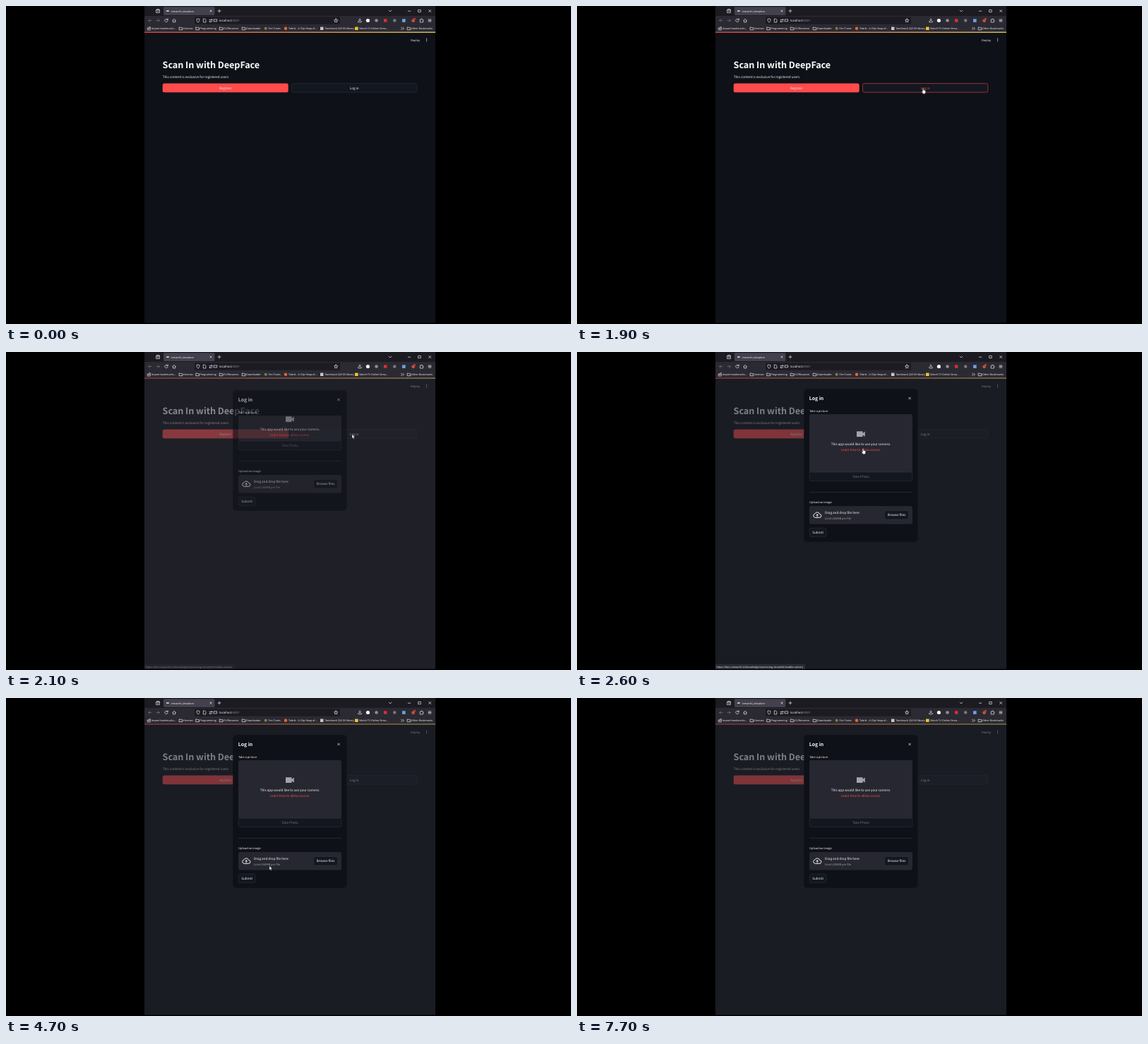
Write an HTML page that moves like this. It is 800 by 450 pixels and loops after 8000 ms.

```html
<!DOCTYPE html>
<html lang="en">
<head>
<meta charset="utf-8">
<title>Log in dialog</title>
<style>
html, body { margin: 0; width: 100%; height: 100%; overflow: hidden; background: #000; }
svg { display: block; width: 100vw; height: 100vh; }
text { fill: #fafafa; text-rendering: geometricPrecision; }
.app text { font: 4.6px "Noto Sans CJK JP", "Noto Sans CJK SC", "Noto Sans CJK", "Noto Sans", sans-serif; }
.app .small { font-size: 4.04px; }
.app .h1 { font-size: 12.65px; font-weight: 700; letter-spacing: -.005em; }
.app .h2 { font-size: 6.9px; font-weight: 700; }
.mid { text-anchor: middle; }
.ui text { font: 3.65px "Open Sans", "Noto Sans", sans-serif; fill: #fbfbfe; }
.ui .url { font-size: 4.3px; }
.icon { fill: none; stroke: #fbfbfe; stroke-width: .65; stroke-linecap: round; stroke-linejoin: round; }
.btn { fill: #131720; stroke: #3d4049; stroke-width: .4; }
.panel { fill: #262730; }
.app .red { fill: #ff4b4b; }
.app .grey { fill: #a3a4a9; }
.app .off { fill: #71737a; }

.hover, .veil, .dialog, .box, .cam, .feed, .low, .status, .cursor, .arrow, .hand {
  animation: 8s linear infinite;
}
.hover { animation-name: hover; animation-timing-function: step-end; }
.veil { animation-name: veil; }
.dialog { animation-name: dialog; }
.box { animation-name: box; }
.cam { animation-name: cam; }
.feed { animation-name: feed; }
.low { animation-name: low; }
.status { animation-name: status; }
.cursor { animation-name: move; }
.arrow { animation-name: arrow; animation-timing-function: step-end; }
.hand { animation-name: hand; animation-timing-function: step-end; }

@keyframes hover { 0%, 25%, 100% { opacity: 0; } 20.5% { opacity: 1; } }
@keyframes veil {
  0%, 25% { fill: rgb(44 44 52 / 0); }
  26.25%, 27.5% { fill: rgb(44 44 52 / .56); }
  30%, 100% { fill: rgb(36 37 46 / .58); }
}
@keyframes dialog {
  0%, 25% { opacity: 0; transform: translateY(3px); }
  26.25%, 27.5% { opacity: .62; transform: translateY(2px); }
  30%, 100% { opacity: 1; transform: none; }
}
@keyframes box { 0%, 27.5% { height: 170.5px; } 28.75%, 100% { height: 216.5px; } }
@keyframes cam { 0%, 27.5% { height: 36px; } 28.75%, 100% { height: 82px; } }
@keyframes feed { 0%, 27.5% { transform: translateY(-23px); } 28.75%, 100% { transform: none; } }
@keyframes low { 0%, 27.5% { transform: translateY(-46px); } 28.75%, 100% { transform: none; } }
@keyframes status {
  0%, 25%, 47.5%, 100% { opacity: 0; }
  26.25%, 27.5% { opacity: .45; }
  28.75%, 46.25% { opacity: 1; }
}
@keyframes move {
  0%, 15% { transform: translate(530px, -12px); animation-timing-function: ease-out; }
  21.25%, 27.5% { transform: translate(490px, 116.6px); }
  30%, 35% { transform: translate(405px, 137px); }
  38.75%, 40% { transform: translate(379.6px, 185.7px); }
  47.5% { transform: translate(384px, 205px); }
  58.75%, 60% { transform: translate(372.9px, 237.6px); }
  66.25%, 100% { transform: translate(365px, 456px); }
}
@keyframes arrow { 0%, 25%, 35.6%, 100% { opacity: 1; } 20.5%, 30% { opacity: 0; } }
@keyframes hand { 0%, 25%, 35.6%, 100% { opacity: 0; } 20.5%, 30% { opacity: 1; } }
</style>
</head>
<body>
<svg viewBox="0 0 800 450" xmlns="http://www.w3.org/2000/svg">
  <defs>
    <linearGradient id="bar"><stop stop-color="#ff4b4b"/><stop offset="1" stop-color="#ffe25c"/></linearGradient>
    <path id="folder" class="icon" d="M-2.2-1.7h1.5l.7.7h2.2v2.9h-4.4z"/>
    <clipPath id="window"><rect x="196" width="412" height="448.5"/></clipPath>
  </defs>
  <rect width="800" height="450"/>

  <g clip-path="url(#window)">
    <g class="ui">
      <rect x="196" width="412" height="14" fill="#1c1b22"/>
      <rect x="196" y="14" width="412" height="23" fill="#2b2a33"/>
      <rect x="223" y="1.3" width="72.5" height="11.6" rx="1.4" fill="#42414d"/>
      <rect x="267" y="15.2" width="206" height="10.6" rx="1.4" fill="#1c1b22"/>

      <!-- title bar -->
      <path class="icon" d="M213 5.8h4.4v3.7H213zM213 5.8l.6-1.3h3.2l.6 1.3M214.4 7.4h1.6"/>
      <rect x="227" y="6.3" width="3.8" height="1.6" fill="#d8d8dc"/>
      <text x="233.7" y="8.5">streamlit_deepface</text>
      <path class="icon" d="M289 5.9l2.2 2.2m0-2.2L289 8.1M300 7h4M302 5v4M542.2 6.2l1.8 1.8 1.8-1.8M569.3 7.2h3.4M584 5.4h3.2v3.2H584zM598.7 5.5l3 3m0-3l-3 3"/>

      <!-- toolbar -->
      <path class="icon" opacity=".38" d="M206 20.5h-4.2m1.8-1.8l-1.8 1.8 1.8 1.8M213 20.5h4.2m-1.8-1.8l1.8 1.8-1.8 1.8"/>
      <path class="icon" d="M229 19.4a2.2 2.2 0 1 0 .1 1.9M229.2 17.9v1.7h-1.7M235.8 20.6l2.3-2.2 2.3 2.2M236.5 20.2v2.7h3.2v-2.7"/>
      <path class="icon" d="M272 18l2 .7c0 2.4-.6 3.8-2 4.5-1.4-.7-2-2.1-2-4.5zM279.7 18.1h2l1.2 1.2v3.7h-3.2zM288 19.4h4m-1-1l1 1-1 1M292 22h-4m1-1l-1 1 1 1M294.5 18.9h4.2v3h-4.2z"/>
      <text class="url" x="302" y="22.1">localhost<tspan fill="#8f8f9d">:8501</tspan></text>
      <path class="icon" d="M467.2 17.9l.8 1.7 1.8.2-1.3 1.3.3 1.8-1.6-.9-1.6.9.3-1.8-1.3-1.3 1.8-.2z"/>
      <path class="icon" d="M501 17.8v3m-1.3-1.2l1.3 1.3 1.3-1.3M498.8 21.4v1.4h4.4v-1.4"/>
      <circle cx="512.4" cy="20.5" r="2.6" fill="#f4f4f6"/>
      <circle cx="524.5" cy="20.5" r="2.3" fill="#8e8e96"/>
      <rect x="534.9" y="18.4" width="4.4" height="4.2" fill="#e52d32"/>
      <circle cx="550.2" cy="20.5" r="2.2" fill="#777985"/>
      <rect x="561" y="18.3" width="4.6" height="4.6" fill="#6e9fe8"/>
      <circle cx="576.6" cy="20.8" r="2.4" fill="#b5583a"/>
      <rect x="577" y="17" width="2.8" height="2.7" rx=".6" fill="#d92f3c"/>
      <path class="icon" d="M586.6 19.2h1.2c-.5-1.5 1.7-1.5 1.2 0h1.3v1.3c1.2-.4 1.2 1.5 0 1.2v1.3h-3.7z"/>
      <path class="icon" d="M598.1 19h3.8M598.1 20.5h3.8M598.1 22h3.8"/>

      <!-- bookmarks -->
      <path class="icon" d="M203 29.7h1.3v4.2h-4v-1.1M199.9 31.4h3m-1-1l1 1-1 1"/>
      <text x="206" y="33.2">Import bookmarks...</text>
      <use href="#folder" x="247.7" y="31.8"/><text x="251" y="33.2">German</text>
      <use href="#folder" x="271.3" y="31.8"/><text x="274.5" y="33.2">Programming</text>
      <use href="#folder" x="304.8" y="31.8"/><text x="308" y="33.2">CV/Resumes</text>
      <use href="#folder" x="336.8" y="31.8"/><text x="340" y="33.2">Downloader</text>
      <circle cx="367.7" cy="31.8" r="2" fill="#6f8a3c"/><text x="371.5" y="33.2">Fen Tunes</text>
      <circle cx="396" cy="31.8" r="2.2" fill="#e8672c"/><text x="400" y="33.2">Tobrik - A Clip Heap of...</text>
      <rect x="445" y="29.6" width="4.4" height="4.4" fill="#c4c7cc"/><text x="451.2" y="33.2">Tannbruck QVI EK library</text>
      <rect x="494" y="29.6" width="4.6" height="4.4" fill="#f2c32e"/><text x="500.3" y="33.2">Watch TV Online Strea...</text>
      <path class="icon" d="M559.5 30.2l1.6 1.6-1.6 1.6M561.9 30.2l1.6 1.6-1.6 1.6"/>
      <use href="#folder" x="570.7" y="31.8"/><text x="574" y="33.2">Other Bookmarks</text>
    </g>

    <g class="app">
      <rect x="196" y="36.8" width="412" height="412" fill="#0e1117"/>
      <rect x="196" y="36.6" width="412" height="1.2" fill="url(#bar)"/>
      <text class="small" x="573" y="49.6">Deploy</text>
      <g fill="#fafafa"><circle cx="595.6" cy="46.1" r=".55"/><circle cx="595.6" cy="47.9" r=".55"/><circle cx="595.6" cy="49.7" r=".55"/></g>
      <text class="h1" x="221.6" y="87.6">Scan In with DeepFace</text>
      <text x="221.7" y="102.1">This content is exclusive for registered users</text>
      <rect x="221.7" y="109.5" width="178" height="12.7" rx="2.5" fill="#ff4b4b"/>
      <text class="mid" x="310.6" y="117.7">Register</text>
      <rect class="btn" x="404.4" y="109.6" width="177.4" height="12.5" rx="2.5"/>
      <text class="mid" x="493.2" y="117.7">Log in</text>
      <g class="hover">
        <rect x="404.4" y="109.6" width="177.4" height="12.5" rx="2.5" fill="#131720" stroke="#ff4b4b" stroke-width=".5"/>
        <text class="mid red" x="493.2" y="117.7">Log in</text>
      </g>
      <rect class="veil" x="196" y="36.6" width="412" height="412"/>

      <g class="dialog">
        <rect class="box" x="321.3" y="52.2" width="161.2" height="216.5" rx="5" fill="#0e1117"/>
        <text class="h2" x="328.8" y="68.3">Log in</text>
        <path class="icon" d="M469.7 64.1l2.7 2.7m0-2.7l-2.7 2.7"/>
        <text class="small" x="329" y="84.5">Take a picture</text>
        <rect class="panel cam" x="329" y="88" width="146" height="82" rx="2.2"/>
        <g class="feed">
          <path d="M396 112.2h8.6v2.8l3.2-2.5v7.3l-3.2-2.5v2.6H396z" fill="#a3a4ab"/>
          <text class="mid" x="401.9" y="131.5">This app would like to use your camera.</text>
          <text class="mid red" x="401.9" y="139.7">Learn how to allow access.</text>
        </g>
        <g class="low">
          <path class="btn" d="M329.2 170h145.6v10.3q0 2.3-2.3 2.3h-141q-2.3 0-2.3-2.3z"/>
          <text class="mid off" x="401.9" y="178.2">Take Photo</text>
          <path d="M329 198.4h146" stroke="#3d4049" stroke-width=".5"/>
          <text class="small" x="329" y="214.4">Upload an image</text>
          <rect class="panel" x="329" y="218" width="146" height="25.6" rx="2.5"/>
          <path class="icon" d="M337 234.3a2.7 2.7 0 0 1-.2-5.3 3.7 3.7 0 0 1 6.9.5 2.4 2.4 0 0 1-.3 4.8zM340.2 233v-3.2m-1.4 1.3l1.4-1.4 1.4 1.4" style="stroke-width:.95"/>
          <text x="351" y="229.2">Drag and drop file here</text>
          <text class="small grey" x="351" y="237">Limit 200MB per file</text>
          <rect class="btn" x="435.6" y="224.4" width="33.8" height="12.6" rx="2.5"/>
          <text class="mid" x="452.5" y="232.4">Browse files</text>
          <rect class="btn" x="329.2" y="249" width="23.8" height="12.6" rx="2.5"/>
          <text class="mid" x="341.1" y="257">Submit</text>
        </g>
      </g>
    </g>

    <g class="ui status">
      <rect x="195.5" y="442.4" width="127.4" height="6.4" rx=".8" fill="#2b2a33" stroke="#4b4a55" stroke-width=".35"/>
      <text x="197.4" y="446.9">https://docs.streamlit.io/knowledge-base/using-streamlit/enable-camera</text>
    </g>
  </g>

  <g class="cursor" fill="#fff" stroke="#111" stroke-width=".3" stroke-linejoin="round">
    <path class="arrow" d="M0 0v5.5l1.3-1.1.9 2 .9-.4-.9-1.9h1.8z"/>
    <path class="hand" d="M-.6 0q.6-.8 1.2 0v2.4q.6-.4 1 .2.6-.3 1 .3.7-.2.9.5v2q-.1 1-.8 2.1h-2.6L-1.8 5q-.4-.9.3-1l.9.7z"/>
  </g>
</svg>
</body>
</html>
```
